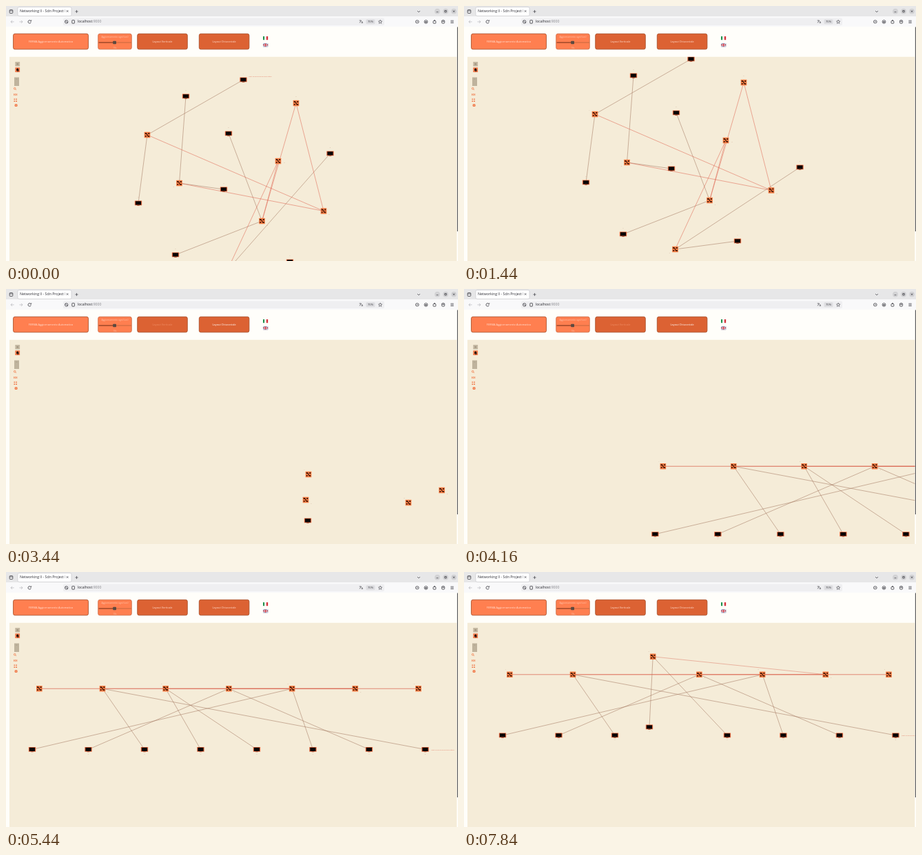
An HTML page with a canvas that plays this animation: 656x370 px, repeating every 8000 ms.

```html
<!DOCTYPE html>
<html lang="it">
<head>
<meta charset="utf-8">
<title>Networking II - Sdn Project</title>
<style>
html, body { margin: 0; width: 100%; height: 100%; overflow: hidden; background: #fffefa; }
canvas { display: block; width: 656px; height: 370px; }
</style>
</head>
<body>
<canvas id="stage"></canvas>
<script>
const W = 656, H = 370, LOOP = 8000, STEP = 80;
const canvas = document.getElementById('stage');
const ctx = canvas.getContext('2d');
const dpr = Math.max(1, window.devicePixelRatio || 1);
canvas.width = W * dpr;
canvas.height = H * dpr;

const SANS = '"Open Sans", "Noto Sans", sans-serif';
const LINK = 'rgba(222,92,72,.72)', CABLE = 'rgba(158,112,88,.72)';

// Free-form topology: position, then label offset for switches
const switches = [
  [190, 157, -8, -6], [406, 111, 0, -10], [380, 195, 9, 2], [236.5, 227, -8, 5],
  [446, 267.5, 8, 5], [356.5, 282, 8, 6], [306.5, 353, -8, 5]
];
const hosts = [
  [329.5, 77], [177, 256], [246, 101], [301, 236],
  [308, 155], [231, 331], [397, 341], [455.5, 184]
];
const trunks = [[0, 4], [3, 4], [1, 4], [1, 5], [2, 5], [2, 6]];
const cables = [[0, 0], [0, 1], [3, 2], [3, 3], [5, 4], [5, 5], [6, 6], [6, 7]];

// Row topology
const rowTrunks = [[2, 5], [1, 5], [0, 5], [0, 4], [6, 4], [6, 3]];
const rowCables = [[1, 2], [1, 7], [2, 3], [2, 4], [3, 1], [3, 6], [4, 0], [4, 5]];
const seeds = [[439, 269], [435, 306], [584, 310], [632.5, 292]];

// Linear keyframes: [time, ...values]
function track(keys, t) {
  if (t <= keys[0][0]) return keys[0].slice(1);
  for (let i = 1; i < keys.length; i++) {
    const a = keys[i - 1], b = keys[i];
    if (t <= b[0]) {
      const k = (t - a[0]) / (b[0] - a[0]);
      return a.slice(1).map((v, j) => v + (b[j + 1] - v) * k);
    }
  }
  return keys[keys.length - 1].slice(1);
}

const pan = [[240, 15, 30], [560, 0, 0]];
const hostPull = [[1120, 0, 0], [1440, 32, 50], [1840, 27.5, 104.5]];
const rowView = [
  [3760, 438, 372, 1], [4400, 181, 346, 1], [4560, 134, 330, 1],
  [4880, 32, 264.3, .8955], [5360, 32, 264.3, .8955], [5680, 56, 237, .8955]
];
const switchPull = [[6240, 0, 0], [6560, 24.5, -26]];
const rowHostPull = [[7200, 0, 0], [7440, -31.5, -12]];

function box(x, y, w, h, fill, r = 0, stroke) {
  ctx.beginPath();
  ctx.roundRect(x, y, w, h, r);
  if (fill) { ctx.fillStyle = fill; ctx.fill(); }
  if (stroke) { ctx.strokeStyle = stroke; ctx.lineWidth = .8; ctx.stroke(); }
}

function line(points, color, width = .7) {
  ctx.beginPath();
  for (let i = 0; i < points.length; i += 2) ctx.lineTo(points[i], points[i + 1]);
  ctx.strokeStyle = color;
  ctx.lineWidth = width;
  ctx.stroke();
}

function ring(x, y, r, color, from = 0, to = 7) {
  ctx.beginPath();
  ctx.arc(x, y, r, from, to);
  ctx.strokeStyle = color;
  ctx.lineWidth = .8;
  ctx.stroke();
}

function text(s, x, y, size, color, align = 'left') {
  ctx.font = size + 'px ' + SANS;
  ctx.textAlign = align;
  ctx.textBaseline = 'middle';
  ctx.fillStyle = color;
  ctx.fillText(s, x, y);
}

function edge(a, b, color) {
  line([a[0], a[1], b[0], b[1]], color);
}

function drawSwitch([x, y], dx, dy, id) {
  box(x - 4.3, y - 4.3, 8.6, 8.6, '#f47b42', .5);
  ctx.save();
  ctx.translate(x, y);
  for (const s of [1, -1]) {
    line([-3 * s, -2 * s, -.6 * s, -2 * s, .8 * s, 1.6 * s, 3 * s, 1.6 * s], '#4a1c0c', .9);
    box(s > 0 ? 1.4 : -3.2, -2.9, 1.8, 1.8, '#3a160a');
    box(s > 0 ? 1.4 : -3.2, 1, 1.8, 1.8, '#3a160a');
  }
  ctx.restore();
  text(id, x + dx, y + dy, 2.4, 'rgba(150,90,70,.55)', 'center');
}

function drawHost([x, y], id, dy) {
  box(x - 5.2, y - 3.6, 10.4, 6.8, '#e2683f', .5);
  box(x - 4.1, y - 2.7, 8.2, 5.1, '#080405');
  box(x - 1.8, y + 3, 3.6, .8, '#a8492c');
  text(id, x, y + dy, 2.4, 'rgba(150,90,70,.5)', 'center');
}

function address(x, y) {
  text('Host 00:00:00:00:00:08/8 attivo', x, y, 2.35, '#e0705a');
}

function drawFree(t) {
  const [px, py] = track(pan, t), [dx, dy] = track(hostPull, t);
  const sw = switches.map(s => [s[0] + px, s[1] + py]);
  const hs = hosts.map((h, i) => i === 7 ? [h[0] + px + dx, h[1] + py + dy] : [h[0] + px, h[1] + py]);
  cables.forEach(([s, h]) => edge(sw[s], hs[h], CABLE));
  trunks.forEach(([a, b]) => edge(sw[a], sw[b], LINK));
  sw.forEach((p, i) => drawSwitch(p, switches[i][2], switches[i][3], i + 1));
  hs.forEach((p, i) => drawHost(p, i + 1, -9));
  address(hs[0][0] + 7.5, hs[0][1] - 5);
}

function drawRows(t) {
  const [ox, oy, z] = track(rowView, t);
  const spread = Math.min(1, Math.max(0, (t - 3440) / 320));
  const grow = (from, to) => to.map((v, i) => from[i] + (v - from[i]) * spread);
  const sw = [], hs = [];
  for (let i = 0; i < 7; i++) {
    sw.push(grow(seeds[i] || [760 + i * 60, 290], [ox + (11.5 + 102.4 * i) * z, oy - 98.5 * z]));
  }
  for (let i = 0; i < 8; i++) {
    hs.push(grow(i ? [720 + i * 60, 336] : [438, 336], [ox + 91 * i * z, oy]));
  }
  const [sx, sy] = track(switchPull, t), [hx, hy] = track(rowHostPull, t);
  sw[2][0] += sx; sw[2][1] += sy;
  hs[3][0] += hx; hs[3][1] += hy;
  if (t >= 3600) {
    rowCables.forEach(([s, h]) => edge(sw[s], hs[h], CABLE));
    rowTrunks.forEach(([a, b]) => edge(sw[a], sw[b], 'rgba(214,84,66,.55)'));
  }
  sw.forEach((p, i) => drawSwitch(p, i % 2 ? 8 : -6, i % 2 ? 5 : -7, i + 1));
  hs.forEach((p, i) => drawHost(p, i + 1, 6.5));
  address(hs[7][0] + 8.5, hs[7][1] + .8);
}

function drawBrowser() {
  const ink = '#3c3c42', pale = '#b4b4b8';
  box(0, 0, W, 15, '#e7e7e8');
  box(0, 15, W, 15, '#f9f9fa');
  box(17, 1.5, 78, 13, '#fff', 2, '#cfcfd2');
  box(5.2, 5.5, 4.6, 5, null, 1, ink);
  line([5.2, 7, 9.8, 7], ink);
  ctx.save();
  ctx.beginPath();
  ctx.rect(18, 0, 68, 15);
  ctx.clip();
  text('Networking II - Sdn Project Home', 20, 8, 5.2, '#2c2c33');
  ctx.restore();
  line([87.8, 6.2, 90.4, 8.8], ink);
  line([90.4, 6.2, 87.8, 8.8], ink);
  line([100.4, 8, 104.6, 8], ink);
  line([102.5, 5.9, 102.5, 10.1], ink);
  line([597, 7, 599, 9, 601, 7], ink);
  for (const x of [626, 638, 650]) {
    ctx.beginPath();
    ctx.arc(x, 7.7, 3.9, 0, 7);
    ctx.fillStyle = '#d2d2d4';
    ctx.fill();
  }
  line([624.6, 8.7, 627.4, 8.7], ink);
  box(636.8, 6.5, 2.4, 2.4, null, 0, ink);
  line([648.7, 6.4, 651.3, 9], ink);
  line([651.3, 6.4, 648.7, 9], ink);

  line([9, 20.9, 7, 22.9, 9, 24.9], pale);
  line([7, 22.9, 11.5, 22.9], pale);
  line([22, 20.9, 24, 22.9, 22, 24.9], pale);
  line([19.5, 22.9, 24, 22.9], pale);
  ring(34.2, 22.9, 2.2, ink, .3, 5.6);
  line([36.8, 20.2, 36.6, 22.1, 34.8, 22], ink);

  box(83, 17.5, 466, 10.8, '#efeff1', 2);
  ring(87.7, 22.9, 2.2, ink);
  line([85.8, 21, 89.8, 25], ink);
  box(95.8, 20.6, 3.6, 4.6, null, .5, ink);
  text('localhost', 104, 23, 5.1, '#29292f');
  const w = ctx.measureText('localhost').width;
  text(':9000', 104 + w, 23, 5.1, '#85858b');
  text('A', 516.8, 23.6, 4.2, ink, 'center');
  line([512.8, 21, 515.6, 21, 513.2, 24.4], ink);
  box(522.5, 19.3, 13, 7, '#dedee1', 1.5);
  text('70%', 529, 23, 4.2, ink, 'center');
  ctx.beginPath();
  for (let i = 0; i < 10; i++) {
    const a = -Math.PI / 2 + i * Math.PI / 5, r = i % 2 ? 1.3 : 2.8;
    ctx.lineTo(543.2 + r * Math.cos(a), 23 + r * Math.sin(a));
  }
  ctx.closePath();
  ctx.strokeStyle = ink;
  ctx.lineWidth = .6;
  ctx.stroke();
  box(594.5, 20.8, 4.6, 4, null, 1.8, ink);
  line([595.8, 22.2, 596.8, 23.2, 597.8, 22.2], ink);
  ring(609.5, 22.9, 2.4, ink);
  box(608.4, 22, 2.2, 2.2, ink, 1);
  box(620, 21.6, 3.8, 3.6, null, .6, ink);
  box(621.2, 20, 1.6, 1.6, ink, .8);
  box(632.4, 20.6, 4.2, 4.6, null, 1.4, ink);
  box(633.6, 21.6, 1.8, 1.6, ink);
  for (const y of [21.2, 22.9, 24.6]) line([645.3, y, 649.7, y], ink);
}

function button(x, w, label, fill, color, border) {
  box(x, 40.3, w, 22.5, fill, 2.5, border);
  text(label, x + w / 2, 51.8, 3.95, color, 'center');
}

function drawFlags() {
  ['#22944f', '#fff', '#d5333d'].forEach((c, i) => box(373 + i * 2.4, 44, 2.4, 5.2, c));
  box(373, 54, 7.2, 5.2, '#3b3f78');
  line([373, 54, 380.2, 59.2], '#fff', 1);
  line([380.2, 54, 373, 59.2], '#fff', 1);
  line([376.6, 54, 376.6, 59.2], '#fff', 2);
  line([373, 56.6, 380.2, 56.6], '#fff', 2);
  line([376.6, 54, 376.6, 59.2], '#d0303c', 1);
  line([373, 56.6, 380.2, 56.6], '#d0303c', 1);
}

function drawHeader(t) {
  const busy = t >= 3040 && t < 4880;
  const coral = '#ff7f50', rust = '#dc6233', border = '#a44c26';
  button(10.5, 109, 'FERMA Aggiornamento Automatico', coral, '#ffe3d6', border);
  button(133.7, 48.6, '', coral, '#fff', '#c96a43');
  text('Aggiornamento ogni (sec)', 158, 44.7, 3.3, '#ffc5ac', 'center');
  line([134.5, 53, 157, 53], '#8d3f22', 1.3);
  line([158, 53, 182, 53], '#c4683f', 1);
  box(155.2, 50.7, 4.8, 4.6, '#5d4a40', .8);
  text('10s', 158, 61, 3, '#ffc5ac', 'center');
  button(190.7, 72.6, 'Layout Verticale', rust, busy ? '#ef8d64' : '#ffe0d2', border);
  button(280.3, 72.6, 'Layout Orizzontale', rust, busy ? '#fff' : '#ffe0d2', border);
  drawFlags();
}

function drawTools() {
  const orange = '#f0794a';
  box(13.3, 81, 6.8, 6.4, '#c4b8a2');
  box(15.4, 83, 2.6, 2.4, '#a39782');
  box(13.3, 89.2, 6.8, 6.8, orange);
  box(15.2, 91, 2.6, 3.2, '#1c0f0a', 1);
  line([16.6, 90.2, 18.4, 93, 17, 95.4], '#1c0f0a', .9);
  box(12, 103.6, 7, 12.4, '#bfb39d');
  line([14.5, 106, 16.5, 106], '#a39782');
  ring(12.7, 119.7, 1.3, orange);
  line([13.6, 120.6, 15, 122], orange);
  ring(13.7, 128.5, 1, orange);
  line([11.6, 127, 11.6, 130], orange);
  line([15.8, 127, 15.8, 130], orange);
  for (const x of [11.5, 14.3]) for (const y of [134.4, 137.2]) box(x, y, 1.7, 1.7, orange);
  box(12.6, 142.3, 4, 3.8, orange, 1.4);
  box(13.9, 143.5, 1.4, 1.4, '#f9c3a4', .7);
}

function draw(t) {
  ctx.setTransform(dpr, 0, 0, dpr, 0, 0);
  box(0, 0, W, H, '#fffefa');
  drawBrowser();
  drawHeader(t);
  ctx.save();
  ctx.beginPath();
  ctx.rect(5, 73.5, 649.5, H);
  ctx.clip();
  box(5, 73.5, 649.5, H, '#f5ecd8');
  if (t < 3040) drawFree(t);
  else if (t >= 3360) drawRows(t);
  drawTools();
  ctx.restore();
  box(654.8, 30.5, 1.2, 296.5, '#5e5e60');
}

const start = performance.now();
function tick() {
  const t = (performance.now() - start) % LOOP;
  draw(Math.floor(t / STEP) * STEP);
  requestAnimationFrame(tick);
}
tick();
</script>
</body>
</html>
```
